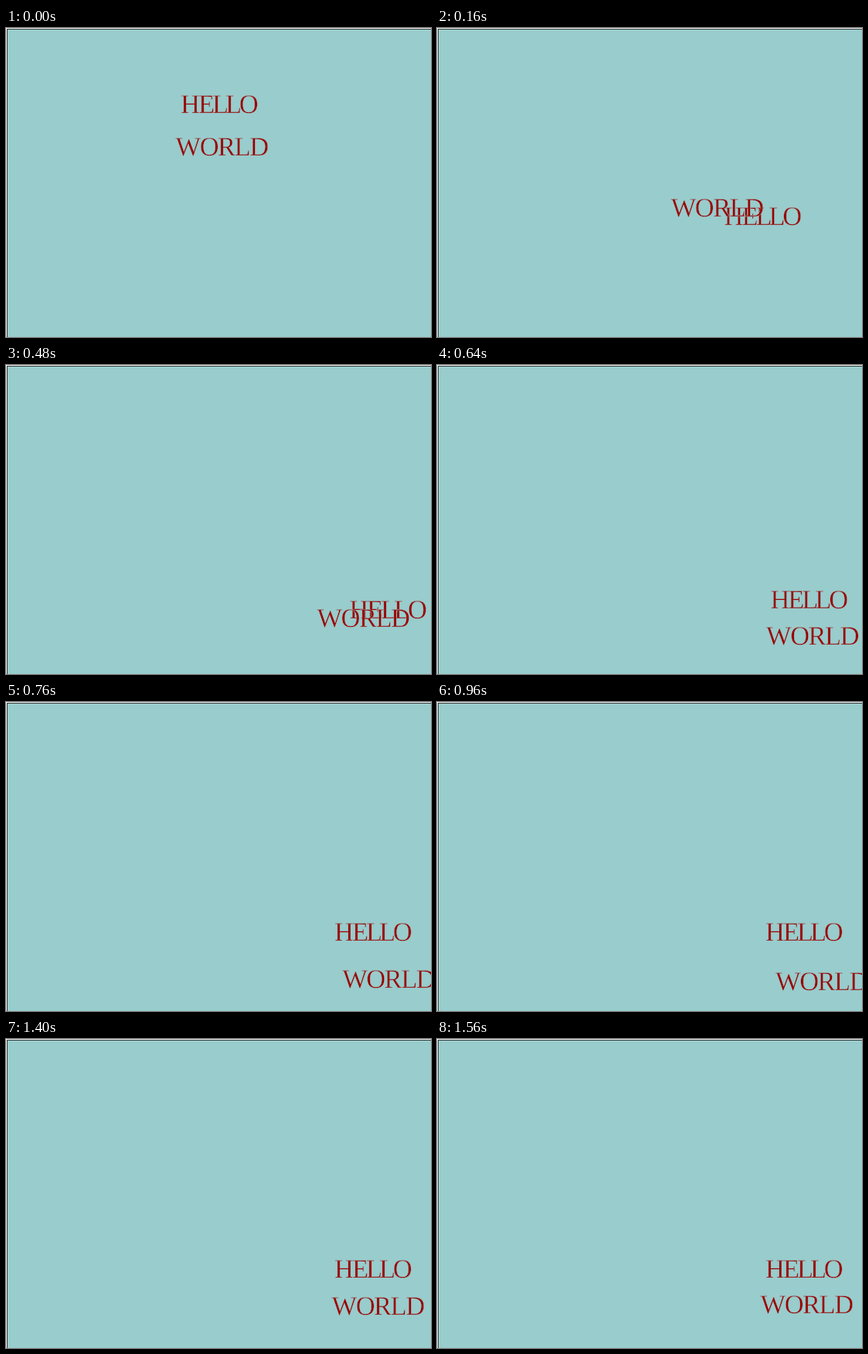
Animation, 550 px wide and 400 px high, one loop 1.6 s. Source, as an HTML page:

```html
<!DOCTYPE html>
<html lang="en">
<head>
<meta charset="utf-8">
<title>Hello World</title>
<style>
  html, body { margin: 0; width: 100%; height: 100%; overflow: hidden; background: #fff; }
  svg { display: block; width: 550px; height: 400px; }
  /* The background-coloured outline thins the letters. */
  text {
    font: 34.5px "Liberation Serif", "Times New Roman", serif;
    font-kerning: none;
    text-rendering: geometricPrecision;
    fill: #900;
    stroke: #9cc;
    stroke-width: .5px;
  }
  #hello { letter-spacing: -3.1px; }
  #world { letter-spacing: -1.5px; }
</style>
</head>
<body>
<svg viewBox="0 0 550 400">
  <rect x="1.5" y="1.5" width="560" height="410" fill="#9cc" stroke="#333" shape-rendering="crispEdges"/>
  <text id="hello">H<tspan dx="1">EL</tspan><tspan dx="-1">LO</tspan></text>
  <text id="world">WORLD</text>
</svg>
<script>
  const LOOP = 1600, STEP = 40;
  const words = [
    { id: "hello", x: 226.1, y: 109.5, dx: 199, dy: 199, duration: 760 },
    { id: "world", x: 219.6, y: 164.5, dx: 199, dy: 190, duration: 1560 }
  ];
  for (const w of words) w.el = document.getElementById(w.id);

  // Back ease-out: overshoots by 10% and settles.
  function backOut(t) {
    const s = 1.70158, u = Math.min(t, 1) - 1;
    return 1 + u * u * ((s + 1) * u + s);
  }

  function draw(ms) {
    const time = Math.floor((ms % LOOP) / STEP) * STEP;
    for (const w of words) {
      const k = backOut(time / w.duration);
      w.el.setAttribute("x", w.x + w.dx * k);
      w.el.setAttribute("y", w.y + w.dy * k);
    }
  }

  const start = performance.now();
  function tick() {
    draw(performance.now() - start);
    requestAnimationFrame(tick);
  }
  tick();
</script>
</body>
</html>
```
